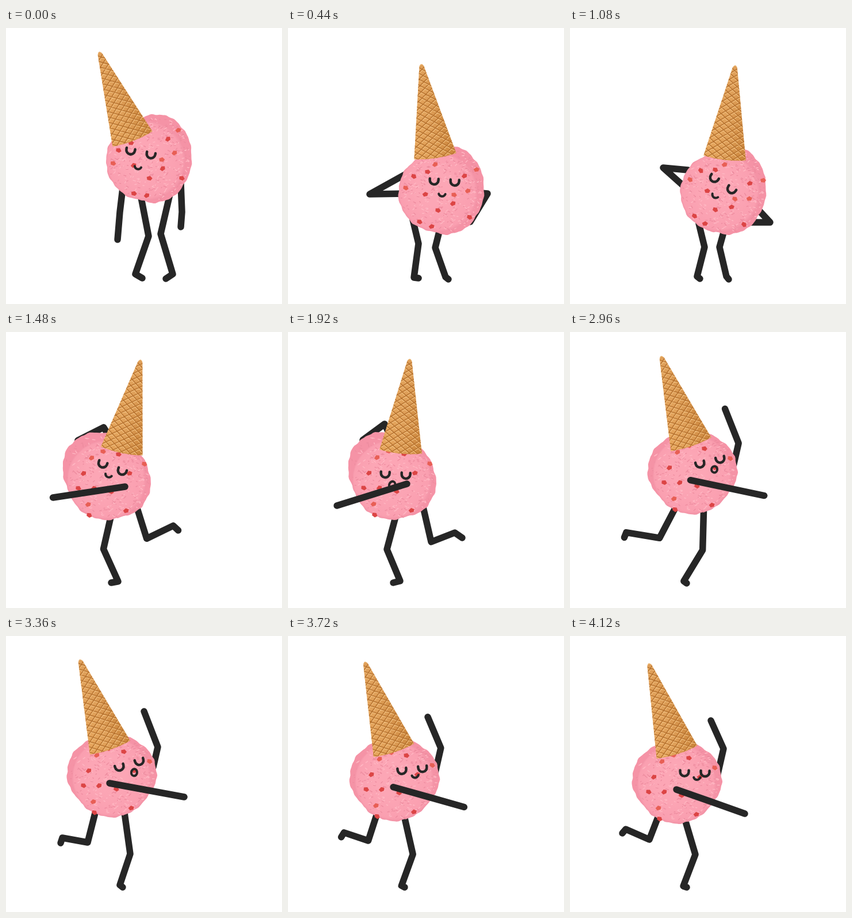
These frames come from a looping animation (480x480 px, 4160 ms). An HTML page with a canvas:

```html
<!DOCTYPE html>
<html lang="en">
<head>
<meta charset="utf-8">
<title>Dancing ice cream</title>
<style>
  html, body { margin: 0; width: 100%; height: 100%; overflow: hidden; background: #fff; }
  canvas { display: block; width: 480px; height: 480px; }
</style>
</head>
<body>
<canvas id="stage" width="480" height="480"></canvas>
<script>
const ctx = document.getElementById('stage').getContext('2d');
const LOOP = 4160, STEP = 40, INK = '#262626', RAD = Math.PI / 180;

// head: scoop x,y | cone base x,y,angle | face x,y,angle | mouth x,y,open
// then left arm, right arm, left leg, right leg as joint coordinates
const pose = (...parts) => parts.flat();

const rise = pose([243, 231, 220, 193, -21, 234, 218, 11, 0, 25, 0],
  [204, 270, 198, 320, 194, 368], [304, 270, 306, 320, 304, 346],
  [234, 290, 248, 362, 225, 428, 237, 435], [286, 285, 269, 358, 290, 428, 278, 436]);
const hipsLeft = pose([261, 286, 256, 223, -8.6, 272, 268, 3, -3, 22, 0],
  [205, 254, 142, 289, 205, 288], [325, 286, 347, 288, 317, 337],
  [215, 325, 227, 375, 219, 434, 227, 435], [264, 350, 256, 382, 274, 433, 279, 437]);
const hipsRight = pose([261, 286, 269, 226, 6.5, 265, 272, 33, 0, 24, 0],
  [200, 277, 162, 243, 205, 247], [322, 310, 348, 338, 305, 338],
  [224, 340, 234, 381, 221, 432, 226, 436], [270, 345, 260, 381, 272, 432, 276, 437]);
const leftUp = pose([181, 257, 196, 208, 5.6, 187, 249, 3, -5, 17, 1],
  [130, 188, 168, 160, 180, 185], [207, 264, 146, 283, 85, 302],
  [188, 318, 172, 378, 195, 433, 183, 436], [234, 300, 249, 365, 290, 349, 303, 358]);
const leftDown = pose([180, 259, 208, 208, 12.7, 190, 236, 23, -1, 14, 0],
  [130, 190, 176, 168, 190, 190], [213, 271, 150, 279, 87, 287],
  [188, 320, 172, 378, 195, 434, 183, 436], [231, 302, 247, 359, 291, 335, 299, 343]);
const rightUp = pose([184, 246, 181, 194, -19, 215, 224, -16, 4, 15, 1],
  [180, 256, 245, 268, 310, 280], [256, 228, 264, 193, 240, 131],
  [157, 300, 142, 359, 98, 351, 95, 360], [205, 300, 216, 379, 198, 433, 203, 437]);
const rightDown = pose([186, 257, 186, 202, -17.6, 217, 239, 1, 4, 8, 0],
  [185, 267, 245, 288, 304, 309], [256, 244, 267, 196, 245, 147],
  [155, 310, 138, 354, 97, 336, 91, 343], [199, 316, 218, 380, 197, 435, 203, 437]);

const mix = (a, b, k) => a.map((v, i) => v + (b[i] - v) * k);

// Moves the upper body; knees follow halfway, feet stay.
function shift(p, dx, dy) {
  const d = [dx, dy];
  return p.map((v, i) => {
    if (i < 11) return v + ([0, 2, 5].includes(i) ? dx : [1, 3, 6].includes(i) ? dy : 0);
    if (i < 23) return v + d[(i - 11) % 2];
    const joint = ((i - 23) % 8) >> 1;
    return v + d[(i - 23) % 2] * [1, 0.5, 0, 0][joint];
  });
}

const leftTop = shift(leftUp, -4, -12);
const keys = [
  [0, rise], [120, shift(hipsLeft, -4, -62)], [280, shift(hipsLeft, 0, 4)], [440, hipsLeft],
  [760, shift(mix(hipsLeft, hipsRight, 0.5), 0, -3)], [1080, hipsRight], [1160, hipsRight],
  [1280, shift(leftUp, -38, -8)], [1540, leftDown], [1800, leftTop], [1920, leftUp],
  [2060, leftDown], [2320, leftTop], [2520, leftDown], [2560, leftDown],
  [2800, shift(leftDown, 0, -10)], [2920, shift(rightUp, 34, 0)], [3080, rightDown],
  [3360, rightUp], [3600, rightDown], [3880, rightUp], [4120, rightDown], [LOOP, rightDown]
];

function poseAt(t) {
  const n = keys.findIndex(k => k[0] > t);
  const [t0, a] = keys[n - 1], [t1, b] = keys[n];
  const k = (t - t0) / (t1 - t0);
  return mix(a, b, k * k * (3 - 2 * k));
}

// Per act: rear scoop offset, radii and tilt, the arm in front, red pieces
const turned = [[-26, -39], [21, -45], [-40, -12], [-6, -50], [-22, 14], [-49, 14], [-32, 42],
  [8, 20], [34, 53], [66, -28], [40, -12], [-30, 61]];
const acts = [
  { end: 1200, back: [17, -4, 63, 77, 5], front: -1, spin: 8.6,
    bits: [[-5, -49], [-18, -36], [46, -29], [28, 4], [26, 19], [0, 31], [52, -3], [-32, 51],
      [-11, 59], [-56, -8], [-22, 3], [55, 43], [67, -40], [-42, -28]] },
  { end: 2840, back: [0, -9, 82, 68, 40], front: 1, bits: turned },
  { end: LOOP, back: [0, -7, 78, 68, 0], front: 0, bits: turned }
];

let seed = 7;
const rnd = () => (seed = seed * 16807 % 2147483647) / 2147483647;
const grain = Array.from({ length: 330 }, () => {
  const r = 66 * Math.sqrt(rnd()), a = rnd() * 2 * Math.PI;
  return { x: r * Math.cos(a), y: r * Math.sin(a), len: 1 + rnd() * 3, tilt: rnd() * 2 - 1,
    color: rnd() < 0.5 ? '#ffb9c4' : '#ed8c9f' };
});

function at(x, y, deg, draw) {
  ctx.save();
  ctx.translate(x, y);
  ctx.rotate(deg * RAD);
  draw();
  ctx.restore();
}

function limb(pts) {
  ctx.beginPath();
  for (let i = 0; i < pts.length; i += 2) ctx.lineTo(pts[i], pts[i + 1]);
  ctx.strokeStyle = INK;
  ctx.lineWidth = 11.5;
  ctx.stroke();
}

function blob(rx, ry, fill) {
  ctx.beginPath();
  for (let i = 0; i < 120; i++) {
    const a = i * 3 * RAD;
    const k = 1 + 0.008 * Math.sin(a * 9) + 0.008 * Math.sin(a * 17 + 1) + 0.005 * Math.sin(a * 31);
    ctx.lineTo(rx * k * Math.cos(a), ry * k * Math.sin(a));
  }
  ctx.closePath();
  ctx.fillStyle = fill;
  ctx.fill();
}

function speckle() {
  ctx.lineWidth = 1.3;
  for (const g of grain) {
    ctx.strokeStyle = g.color;
    ctx.beginPath();
    ctx.moveTo(g.x, g.y);
    ctx.lineTo(g.x + g.len, g.y + g.len * g.tilt);
    ctx.stroke();
  }
}

function scoop(x, y, angle, act) {
  const [dx, dy, rx, ry, tilt] = act.back;
  at(x + dx, y + dy, tilt, () => {
    blob(rx, ry, '#f593a6');
    ctx.save();
    ctx.scale(rx / 70, ry / 70);
    speckle();
    ctx.restore();
  });
  const spin = act.spin ? angle + act.spin : 0;
  at(x, y, spin, () => {
    const shade = ctx.createRadialGradient(-8, -8, 30, 0, 0, 71);
    shade.addColorStop(0, '#fca6b5');
    shade.addColorStop(0.85, '#fa9fb0');
    shade.addColorStop(1, '#f08fa3');
    blob(69, 69, shade);
    speckle();
    act.bits.forEach(([bx, by], i) => at(bx, by, i * 47 % 90 - 40, () => {
      ctx.beginPath();
      ctx.moveTo(-5, -2);
      ctx.lineTo(1, -4);
      ctx.lineTo(5, 0);
      ctx.lineTo(2, 4);
      ctx.lineTo(-4, 3);
      ctx.closePath();
      ctx.fillStyle = i % 3 ? '#dc4545' : '#e85f55';
      ctx.fill();
    }));
  });
}

function cone(x, y, angle) {
  at(x, y, angle, () => {
    ctx.beginPath();
    ctx.moveTo(-37, 0);
    ctx.lineTo(-4, -158);
    ctx.quadraticCurveTo(0, -166, 4, -158);
    ctx.lineTo(37, 0);
    ctx.quadraticCurveTo(2, 7, -37, 0);
    const fill = ctx.createLinearGradient(-36, 0, 36, 0);
    fill.addColorStop(0, '#e7a65c');
    fill.addColorStop(0.5, '#dfa05a');
    fill.addColorStop(1, '#c98339');
    ctx.fillStyle = fill;
    ctx.fill();
    ctx.clip();
    for (const [color, width, drop] of [['#f0bd7c', 1.2, 2], ['#b97532', 1.5, 0]]) {
      ctx.strokeStyle = color;
      ctx.lineWidth = width;
      ctx.beginPath();
      for (let s = -230; s < 70; s += 11) {
        for (const side of [-1, 1]) {
          ctx.moveTo(side * 42, s + drop + 42);
          ctx.lineTo(side * -42, s + drop - 20);
        }
      }
      ctx.stroke();
    }
  });
}

function face(x, y, angle, mx, my, open) {
  at(x, y, angle, () => {
    ctx.strokeStyle = INK;
    ctx.lineWidth = 4.5;
    for (const ex of [-18, 18]) {
      ctx.beginPath();
      ctx.moveTo(ex - 7.5, -5);
      ctx.arc(ex, -2.5, 7.5, Math.PI, 0, true);
      ctx.lineTo(ex + 7.5, -5);
      ctx.stroke();
    }
    ctx.lineWidth = 4;
    ctx.beginPath();
    if (open > 0.5) ctx.ellipse(mx, my, 5, 3 + 3 * open, 0.4, 0, 2 * Math.PI);
    else ctx.arc(mx, my - 3, 6, 0.1 * Math.PI, 0.9 * Math.PI);
    ctx.stroke();
  });
}

function draw(t) {
  const p = poseAt(t), act = acts.find(a => t < a.end);
  const arms = [p.slice(11, 17), p.slice(17, 23)];
  ctx.fillStyle = '#fff';
  ctx.fillRect(0, 0, 480, 480);
  ctx.lineCap = ctx.lineJoin = 'round';
  limb(p.slice(23, 31));
  limb(p.slice(31, 39));
  arms.forEach((arm, i) => i !== act.front && limb(arm));
  scoop(p[0], p[1], p[4], act);
  cone(p[2], p[3], p[4]);
  face(...p.slice(5, 11));
  if (act.front >= 0) limb(arms[act.front]);
}

function frame() {
  const t = performance.now() % LOOP;
  draw(t - t % STEP);
  requestAnimationFrame(frame);
}
frame();
</script>
</body>
</html>
```
